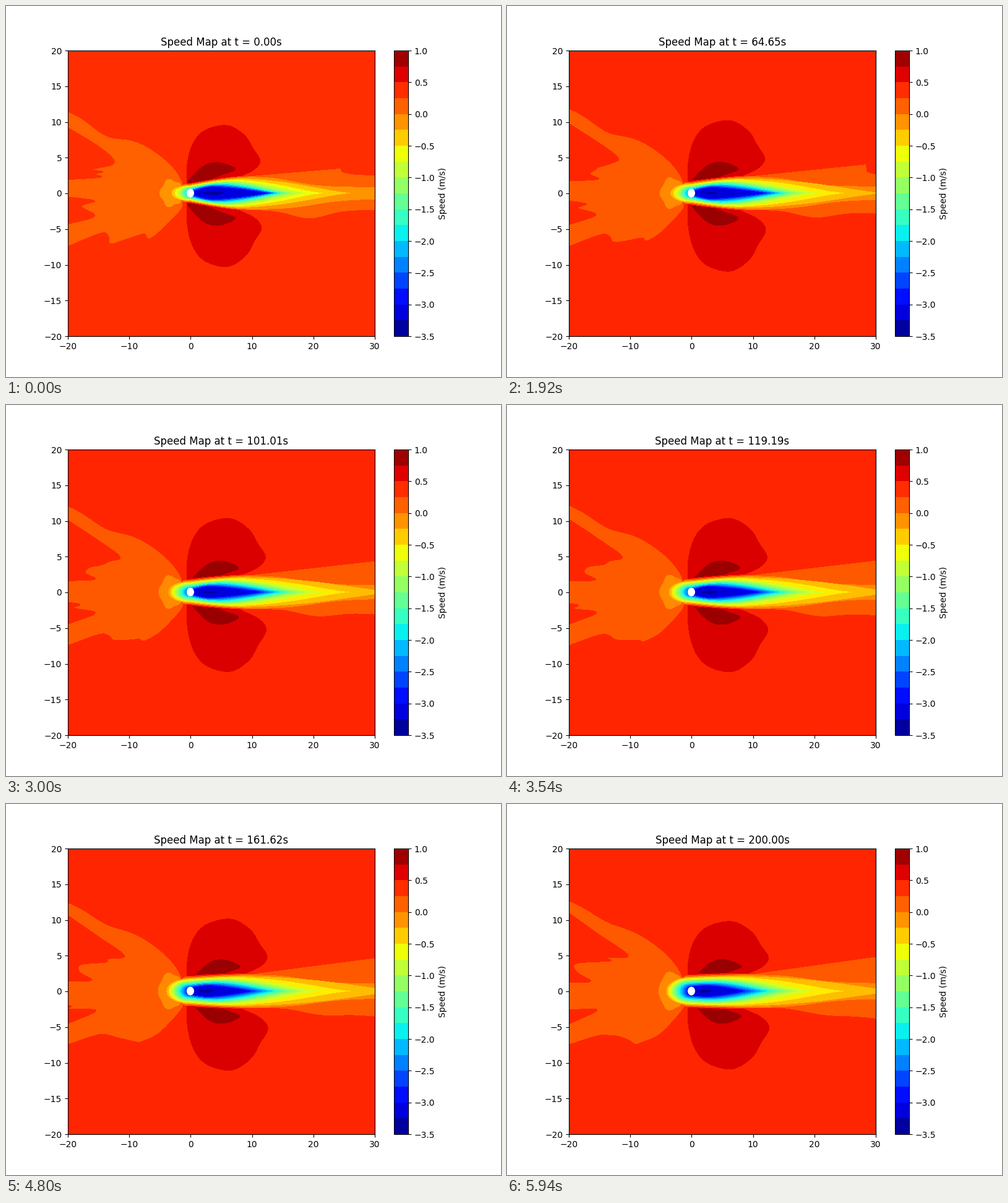
Recreate the animation shown at these times as a matplotlib script. Size 800 by 600 pixels, loop 6000 ms.

```python
import numpy as np
import matplotlib.pyplot as plt
from matplotlib.animation import FuncAnimation
from matplotlib.patches import Polygon, Ellipse

FRAMES, INTERVAL = 100, 60
T_END = 200.0
STEP = 0.25
CX, CY = 298.0, 302.5      # cylinder centre, stage pixels
JET = plt.get_cmap("jet")


def to_data(p):
    """Stage pixels to axes units."""
    return np.column_stack([(p[:, 0] - 100) / 9.92 - 20, (303 - p[:, 1]) / 11.55])


def smooth(points, n=8):
    """Open Catmull-Rom curve through the points."""
    p = np.asarray(points, float)
    p = np.vstack([2 * p[0] - p[1], p, 2 * p[-1] - p[-2]])
    a, b, c, d = (p[k:len(p) - 3 + k, None, :] for k in range(4))
    u = (np.arange(n + 1) / n)[None, :, None]
    q = 0.5 * (2 * b + (c - a) * u + (2 * a - 5 * b + 4 * c - d) * u**2
               + (3 * b - a - 3 * c + d) * u**3)
    return q.reshape(-1, 2)


def morph(start, end, s):
    return smooth(np.array(start) * (1 - s) + np.array(end) * s)


def ribbon(x, up, low):
    """Area around the centre line, given its reach above and below."""
    return np.column_stack([np.concatenate([x, x[::-1]]),
                            np.concatenate([CY - up, CY + low[::-1]])])


def ease(s):
    return np.sin(np.pi / 2 * s)


def rank(level):
    """0 in the slow core of the wake, 1 at its outer contour."""
    return (level + 3.25) / 3


def slowest(t):
    return -3.32 - 0.2 * (1 - np.exp(-t / 15)) - 0.07 * t / T_END


def band_color(low, t):
    """Fill of the band above low; the colour range follows the minimum."""
    base = STEP * np.floor(slowest(t) / STEP)
    return JET((low - base + STEP / 2) / (1 - base))


# Flow ahead of the cylinder

FRONT_LOW_0 = [(2, 14), (6, 27), (35, 57), (56, 73), (64, 65), (100, 76),
               (118, 81), (121, 68), (135, 64), (192, 87)]
FRONT_LOW_1 = [(2, 15), (4, 29), (40, 68), (70, 82), (79, 85), (90, 78),
               (107, 72), (120, 71), (140, 71), (192, 87)]
GAP_UP_0 = [(95, 194), (145, 224), (172, 246), (171, 257), (140, 264),
            (157, 268), (144, 272), (153, 277), (95, 281)]
GAP_UP_1 = [(95, 173), (150, 212), (196, 245), (163, 249), (166, 254),
            (112, 258), (113, 272), (135, 287), (95, 288)]
GAP_LOW_0 = [(95, 308), (143, 315), (122, 324), (143, 340), (95, 354)]
GAP_LOW_1 = [(95, 328), (97, 330), (98, 333), (146, 333), (95, 358)]


def front(s):
    d = np.linspace(192, 0, 120)
    dip = 16 * (1 - s / 2) * np.exp(-((d - 125) / 35) ** 2)
    top = np.column_stack([287 - d, CY - (9.6 + s) * np.sqrt(d) + dip])
    low = morph(FRONT_LOW_0, FRONT_LOW_1, s)
    return np.vstack([top, np.column_stack([287 - low[:, 0], CY + low[:, 1]])])


def bow(s):
    a = np.linspace(0, 2 * np.pi, 120)
    r = 1 + (0.1 - 0.05 * s) * np.cos(5 * (a - np.pi))
    return np.column_stack([267 - s + (17 + 2.5 * s) * r * np.cos(a),
                            CY + (21 + 9 * s) * r * np.sin(a)])


# Fast lobes beside the cylinder, as unit outlines

LOBE = [(0, 0.1), (0.01, 0.44), (0.08, 0.72), (0.22, 0.91), (0.45, 1), (0.62, 0.98),
        (0.8, 0.84), (0.9, 0.66), (0.99, 0.51), (0.98, 0.42), (0.89, 0.33),
        (0.75, 0.26), (0.5, 0.15)]
CORE = [(0, 0.25), (0.1, 0.5), (0.36, 0.88), (0.6, 1), (0.85, 0.92), (1, 0.76),
        (0.75, 0.61), (0.4, 0.4)]


def lobe(unit, left, width, height):
    return smooth(unit) * [width, height] + [left, CY]


def upper_lobe(s):
    return lobe(LOBE, 292, 119 + 12 * ease(s), -109 - 3 * s - 8 * np.sin(np.pi * s))


def lower_lobe(s):
    return lobe(LOBE, 292, 121 + 11 * ease(s), 118.5 + 7 * s + 6 * np.sin(np.pi * s))


def upper_core(s):
    return lobe(CORE, 291 + 8 * ease(s), 79, -49.5 - 1.5 * s)


def lower_core(s):
    return lobe(CORE, 291 + 8 * ease(s), 79, 52.5)


# Wake

def waist(v, s):
    """Half height beside the cylinder."""
    return max(5.5 * s**2 + (12 + 4.5 * ease(s)) * v, 0)


def body(v, x, s):
    """Half height downstream, before any taper."""
    w = waist(v, s)
    return w + (8.5 + 16 * v - w) * ease(np.clip((x - CX) / (30 + 70 * v), 0, 1))


def sheath(level, x0, x1):
    """Thin layer between the wake and the lobes."""
    def outline(s):
        x = np.linspace(x0, x1, 80)
        h = body(rank(level), x, s)
        return ribbon(x, h, h)
    return outline


def wake_edge(s):
    x = np.linspace(288, 605, 300)
    h = body(rank(0.25), x, s)
    crest = 541 + 0.6 * T_END * s
    up = np.where(x < crest, h + (0.085 + 0.055 * s) * np.maximum(x - 400, 0),
                  28 + 6 * np.exp(-np.abs(x - crest) / 15))
    bump = 13 * (1 - 0.7 * s) * np.exp(-((x - 490 - 25 * s) / 40) ** 2)
    low = h + bump + 17 * s * np.clip((x - 450) / 150, 0, 1)
    return ribbon(x, up, low)


def wake_inner(s):
    x = np.linspace(286, 605, 200)
    h = body(rank(0), x, s)
    far = 9 + 3 * s

    def taper(length):
        return far + (h - far) / (1 + ((x - CX) / length) ** 8)

    return ribbon(x, taper(170 + 20 * s), taper(205))


def wake(level):
    def outline(s):
        v = rank(level)
        vp = max(v, 0)
        start = 304 - 10 * s - (24 + 12 * s) * v - 12 * (1 - s) * vp**4
        tip = (415 - 41 * s**1.8 + (50 + 60 * ease(s)) * v
               + (91 + 59 * ease(s)) * vp ** (7 + 2 * s))
        # contours near the minimum speed shrink away
        q = np.clip((level - slowest(s * T_END)) / 0.35, 0, 1)
        tip = start + (tip - start) * (0.3 + 0.7 * q)
        start += 18 * (1 - q)
        mid = max(start, CX)
        a = np.linspace(0, np.pi / 2, 16)
        nose_x, nose_h = mid - (mid - start) * np.cos(a), waist(v, s) * np.sin(a)
        u = np.linspace(0, 1, 90)
        tail_x = mid + (tip - mid) * u
        tail_h = body(v, tail_x - mid + CX, s) * (1 - u ** (2 + v)) ** (1 + 0.6 * v)
        h = np.concatenate([nose_h, tail_h]) * np.sqrt(q)
        return ribbon(np.concatenate([nose_x, tail_x]), h, h)
    return outline


# Back to front: lower bound of the band, outline
layers = [
    (0.0, front),
    (0.25, lambda s: morph(GAP_UP_0, GAP_UP_1, s)),
    (0.25, lambda s: morph(GAP_LOW_0, GAP_LOW_1, s)),
    (0.5, upper_lobe),
    (0.5, lower_lobe),
    (0.75, upper_core),
    (0.75, lower_core),
    (0.5, sheath(0.75, 292, 372)),
    (0.25, sheath(0.5, 288, 430)),
    (0.0, wake_edge),
    (-0.25, bow),
    (-0.25, wake_inner),
]
layers += [(lv - STEP, wake(lv)) for lv in np.arange(-0.25, -3.51, -STEP)]

fig, ax = plt.subplots(figsize=(8, 6), dpi=100)
scale = ax.contourf([[-3.5, 1], [-3.5, 1]], levels=np.arange(-3.5, 1.01, STEP), cmap="jet")
fig.colorbar(scale, ax=ax, label="Speed (m/s)")
scale.set_visible(False)
ax.set_xlim(-20, 30)
ax.set_ylim(-20, 20)
title = ax.set_title("")

patches = [ax.add_patch(Polygon(np.zeros((3, 2)), lw=0, antialiased=False))
           for _ in layers]
ax.add_patch(Ellipse(((CX - 100) / 9.92 - 20, (303 - CY) / 11.55),
                     12 / 9.92, 14 / 11.55, fc="white", lw=0))


def draw(i):
    s = i / (FRAMES - 1)
    t = s * T_END
    title.set_text(f"Speed Map at t = {t:.2f}s")
    ax.set_facecolor(band_color(0.25, t))
    for (low, outline), patch in zip(layers, patches):
        patch.set_xy(to_data(outline(s)))
        patch.set_facecolor(band_color(low, t))
    return []


anim = FuncAnimation(fig, draw, frames=FRAMES, interval=INTERVAL, repeat=True)
plt.show()
```
